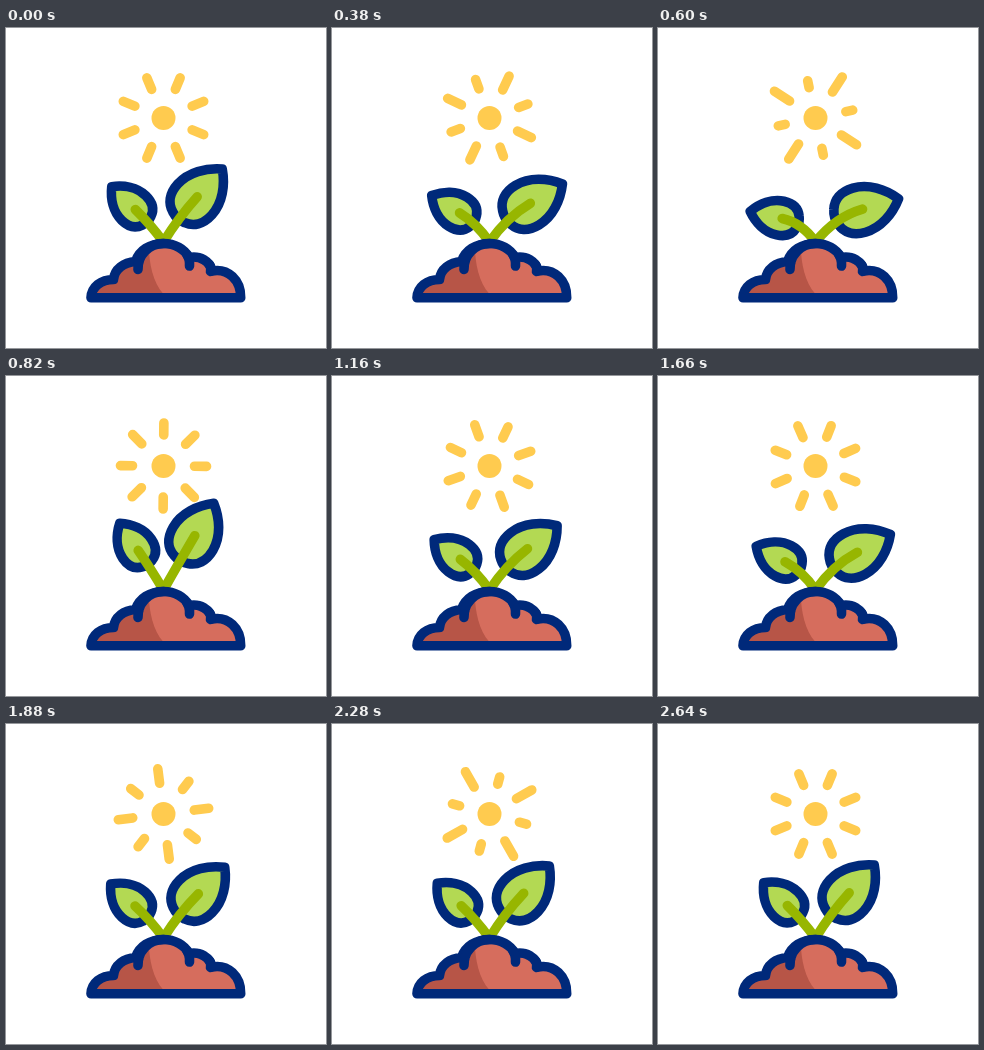
Write an HTML page that moves like this. It is 320 by 320 pixels and loops after 3000 ms.

```html
<!DOCTYPE html>
<html lang="en">
<head>
<meta charset="utf-8">
<title>Sprout in the sun</title>
<style>
html, body { margin: 0; width: 100%; height: 100%; overflow: hidden; background: #fff; }
svg { display: block; width: 100vw; height: 100vh; }
.line { fill: none; stroke: #00297a; stroke-width: 9.6; stroke-linecap: round; stroke-linejoin: round; }
.leaf { fill: #b3d953; stroke: #00297a; stroke-linejoin: round; }
.stem { fill: none; stroke: #97b600; stroke-width: 9.6; stroke-linecap: round; }
.ray { stroke: #ffcb4f; stroke-width: 9.6; stroke-linecap: round; }
</style>
</head>
<body>
<svg viewBox="0 0 320 320" xmlns="http://www.w3.org/2000/svg">
  <defs>
    <clipPath id="mound">
      <path id="hill" d="M85 269.800C85.500 259 95 251.500 107.500 251.500C108.500 241 117.500 234.500 129.500 233.500C133 222.500 144 215.500 157.500 215.500C168.500 215.500 178.500 221 183 229.500C194 227.500 204 233 206 243C222 240 235 252 234.700 269.800Z"/>
    </clipPath>
  </defs>
  <g id="sun"><circle cx="157.500" cy="90" r="12" fill="#ffcb4f"/></g>
  <g id="plant"></g>
  <g clip-path="url(#mound)">
    <rect x="80" y="210" width="160" height="65" fill="#d66d5d"/>
    <path d="M80 210H143C142 232 146 253 157.500 266V275H80Z" fill="#b75547"/>
  </g>
  <use href="#hill" class="line"/>
  <path class="line" d="M157.500 215.500C143 215.500 131.500 227 132 241.500M181 227Q184 231 183.500 238M203 236Q205.500 239 204.500 243.500"/>
</svg>
<script>
const NS = 'http://www.w3.org/2000/svg';
const LOOP = 3000, START = 180, SPAN = 2440;
const SUN = { x: 157.5, y: 90 }, ROOT = { x: 157.5, y: 214 };
const LEAF = 'M0 -37C13 -27 23 -12 23 4C23 17 17 25 8 28Q0 31 -8 28C-17 25 -23 17 -23 4C-23 -12 -13 -27 0 -37Z';

// Sway in degrees over time.
const SWAY = [[200, 0], [560, 34], [870, -13], [1450, 33.5], [1900, 2.6], [2620, 0]];

// Poses by sway: sway, leaf x, leaf y, leaf angle.
const LEAVES = [
  { size: 1, back: 0.5, bend: 28,
    poses: [[-10, 189, 159, 30], [0, 191.5, 168.5, 42], [16, 198.3, 174.6, 58], [33, 205.5, 181.5, 75]] },
  { size: 0.75, back: 5, bend: 20,
    poses: [[-10, 129.5, 170, -34], [0, 125.7, 178, -46], [16, 123.6, 181.7, -57], [33, 119, 190, -79]] }
];

const clamp = u => Math.max(0, Math.min(1, u));
const smooth = u => u * u * (3 - 2 * u);
const mix = (a, b, u) => a + (b - a) * u;

function add(parent, tag, attrs) {
  const el = document.createElementNS(NS, tag);
  for (const k in attrs) el.setAttribute(k, attrs[k]);
  return parent.appendChild(el);
}

const rays = Array.from({ length: 8 }, () =>
  add(document.getElementById('sun'), 'line', { class: 'ray' }));

const plant = document.getElementById('plant');
for (const leaf of LEAVES) {
  leaf.blade = add(plant, 'path', { class: 'leaf', d: LEAF, 'stroke-width': 9.6 / leaf.size });
}
for (const leaf of LEAVES) leaf.stem = add(plant, 'path', { class: 'stem' });

function segment(keys, v) {
  let i = 0;
  while (i < keys.length - 2 && v > keys[i + 1][0]) i++;
  const a = keys[i], b = keys[i + 1];
  return { a, b, u: (v - a[0]) / (b[0] - a[0]) };
}

function swayAt(t) {
  const { a, b, u } = segment(SWAY, t);
  return mix(a[1], b[1], smooth(clamp(u)));
}

// Swings between +1 and -0.5, starting and ending at 0.
function pulseAt(u) {
  const k = Math.min(5, Math.floor(u * 6));
  const level = i => i === 0 || i === 6 ? 0 : i % 2 ? 1 : -0.5;
  return mix(level(k), level(k + 1), smooth(u * 6 - k));
}

function drawSun(t) {
  const u = clamp((t - START) / SPAN);
  const turn = 135 * smooth(u), pulse = 5.5 * pulseAt(u);
  rays.forEach((ray, i) => {
    const a = (22.5 + 45 * i + turn) * Math.PI / 180;
    const sx = Math.sin(a), sy = -Math.cos(a);
    const far = 43.5 + (i % 2 ? -pulse : pulse);
    ray.setAttribute('x1', SUN.x + 31 * sx);
    ray.setAttribute('y1', SUN.y + 31 * sy);
    ray.setAttribute('x2', SUN.x + far * sx);
    ray.setAttribute('y2', SUN.y + far * sy);
  });
}

function drawLeaf(leaf, sway) {
  const { a, b, u } = segment(leaf.poses, sway);
  const [x, y, angle] = [1, 2, 3].map(i => mix(a[i], b[i], u));
  const r = angle * Math.PI / 180;
  const along = d => `${x - d * Math.sin(r)} ${y + d * Math.cos(r)}`;
  leaf.blade.setAttribute('transform', `translate(${x} ${y}) rotate(${angle}) scale(${leaf.size})`);
  leaf.stem.setAttribute('d',
    `M${ROOT.x} ${ROOT.y}Q${along(leaf.back + leaf.bend)} ${along(leaf.back)}`);
}

function draw(now) {
  const t = now % LOOP;
  drawSun(t);
  const sway = swayAt(t);
  for (const leaf of LEAVES) drawLeaf(leaf, sway);
}

let first;
function tick(now) {
  if (first === undefined) first = now;
  draw(now - first);
  requestAnimationFrame(tick);
}
draw(0);
requestAnimationFrame(tick);
</script>
</body>
</html>
```
